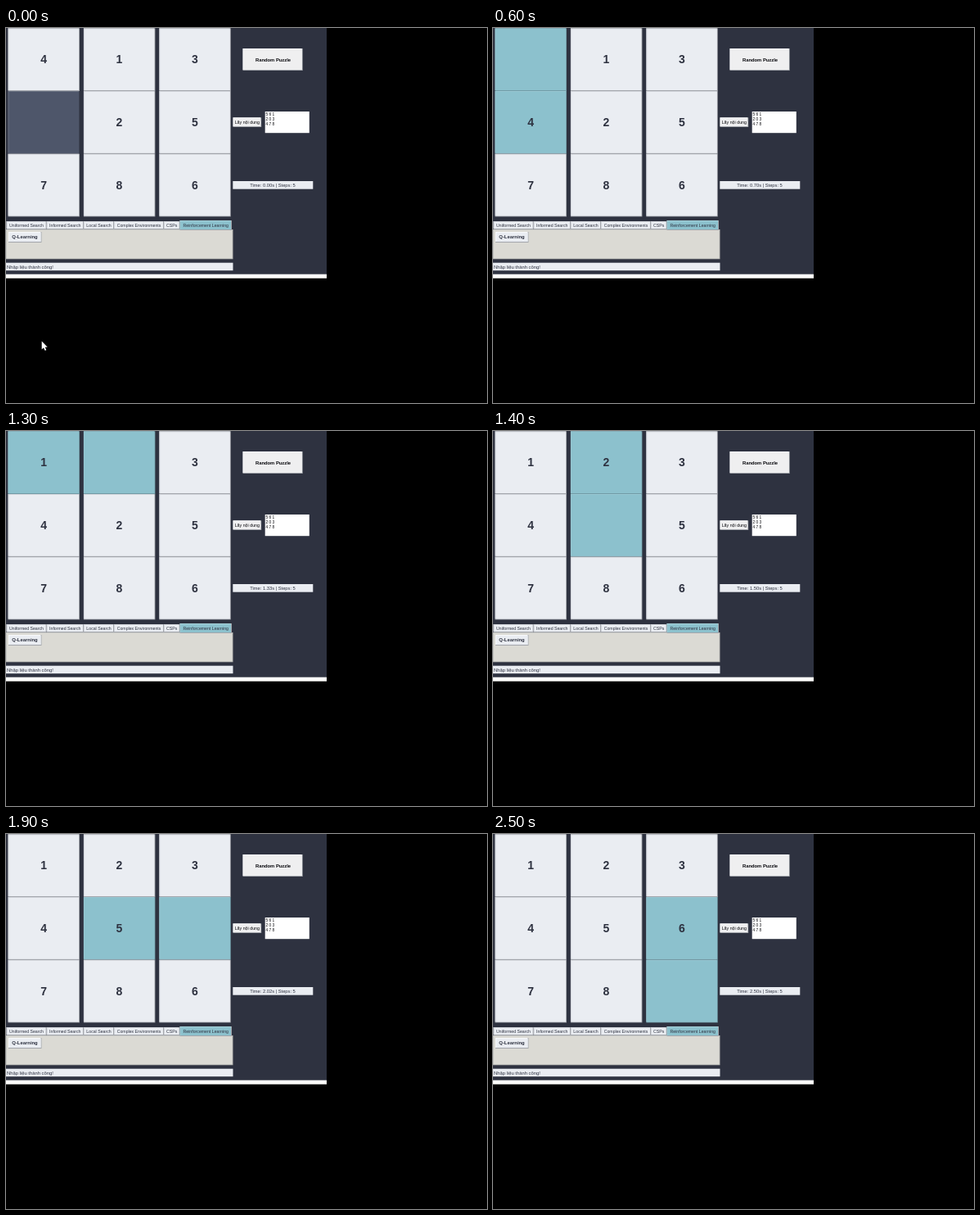
Recreate the animation shown at these times as an HTML page with a canvas. Size 588 px wide and 458 px high, loop 2700 ms.

```html
<!DOCTYPE html>
<html lang="vi">
<head>
<meta charset="utf-8">
<style>
html, body { margin: 0; width: 100%; height: 100%; overflow: hidden; background: #000; }
canvas { display: block; }
</style>
</head>
<body>
<canvas id="stage" width="588" height="458"></canvas>
<script>
const ctx = document.getElementById('stage').getContext('2d');
const LOOP = 2700;
const INK = '#2e3240', PALE = '#eaedf2', TEAL = '#8cc1cd', SLATE = '#4e566a';
const FACE = '#efeff0', BLACK = '#08080c';

const START = '413025786';
const blankPath = [3, 0, 1, 4, 5, 8];
const FIRST_MOVE = 400, MOVE_EVERY = 500;

// [time in ms, clock reading]
const clock = [
  [0, '0.00'], [100, '0.10'], [200, '0.21'], [300, '0.32'], [400, '0.50'], [500, '0.60'],
  [600, '0.70'], [900, '1.01'], [1000, '1.11'], [1100, '1.22'], [1300, '1.33'], [1400, '1.50'],
  [1600, '1.70'], [1900, '2.02'], [2000, '2.12'], [2300, '2.33'], [2400, '2.50']
];

const tabs = [
  ['Uniformed Search', 0.5, 49.5], ['Informed Search', 49.5, 95], ['Local Search', 95, 132],
  ['Complex Environments', 132, 193], ['CSPs', 193, 212.5], ['Reinforcement Learning', 212.5, 276]
];

function box(x, y, w, h, fill) {
  ctx.fillStyle = fill;
  ctx.fillRect(x, y, w, h);
}

function raised(x, y, w, h, fill, light = '#f8f9fb', shade = '#a3a6ac') {
  box(x, y, w, h, shade);
  box(x, y, w - 1, h - 1, light);
  box(x + 1, y + 1, w - 2, h - 2, fill);
}

// y is the vertical middle of the capitals
function label(text, x, y, size, { bold = false, align = 'left', color = INK } = {}) {
  ctx.font = `${bold ? 'bold ' : ''}${size}px "Liberation Sans", Arial, sans-serif`;
  ctx.textAlign = align;
  ctx.fillStyle = color;
  ctx.fillText(text, x, y + size * 0.36);
}

function drawBoard(time) {
  const moves = Math.max(0, Math.min(5, Math.floor((time - FIRST_MOVE) / MOVE_EVERY) + 1));
  const board = [...START];
  for (let i = 1; i <= moves; i++) {
    board[blankPath[i - 1]] = board[blankPath[i]];
    board[blankPath[i]] = '0';
  }
  const lit = moves ? [blankPath[moves - 1], blankPath[moves]] : [];
  board.forEach((digit, i) => {
    const col = i % 3, row = Math.floor(i / 3);
    const x = 2.5 + col * 92.4, y = 0.3 + row * 76.7;
    if (lit.includes(i)) raised(x, y, 87.5, 76.7, TEAL, '#98c7d2', '#719ba6');
    else if (digit === '0') raised(x, y, 87.5, 76.7, SLATE, '#687080', '#3c4353');
    else raised(x, y, 87.5, 76.7, PALE, '#d3d6dc');
    if (digit !== '0') label(digit, x + 43.6, y + 38, 14, { bold: true, align: 'center' });
  });
}

function drawTabs() {
  raised(0, 246, 277.5, 36.3, '#dbdad4', '#c8c9c6', '#b4b4b0');
  tabs.forEach(([name, left, right], i) => {
    const selected = i === tabs.length - 1;
    raised(left, selected ? 235 : 236, right - left, selected ? 12 : 10,
      selected ? TEAL : PALE, selected ? '#a5d0d9' : '#d3d6dc', '#a3a6ac');
    label(name, (left + right) / 2, 241, 5.2, { align: 'center' });
  });
  raised(3, 249, 40.5, 13, PALE);
  label('Q-Learning', 23, 255.2, 5.9, { bold: true, align: 'center' });
}

function drawSidePanel(time) {
  raised(289.5, 25, 73.2, 27, FACE);
  label('Random Puzzle', 326.5, 38.4, 5.85, { bold: true, align: 'center', color: BLACK });
  raised(277.5, 109.3, 34.7, 11.7, FACE);
  label('Lấy nội dung', 294.8, 115, 5.3, { align: 'center', color: BLACK });
  box(316.7, 102, 54.1, 26.2, '#fff');
  ['5 6 1', '2 0 3', '4 7 8'].forEach((line, i) => {
    label(line, 317.6, 105.7 + i * 6, 4.8, { color: BLACK });
  });
  box(277.3, 187, 98, 9.7, PALE);
  const reading = clock.findLast(([start]) => start <= time)[1];
  label(`Time: ${reading}s | Steps: 5`, 298.2, 191.8, 5.75);
}

function drawPointer(x, y) {
  const outline = [[0, 0], [0, 10], [2.3, 7.9], [4, 11.5], [5.6, 10.8], [4, 7.3], [7, 7.2]];
  ctx.beginPath();
  outline.forEach(([dx, dy]) => ctx.lineTo(x + dx, y + dy));
  ctx.closePath();
  ctx.fillStyle = '#fff';
  ctx.fill();
}

function draw(time) {
  box(0, 0, 588, 458, '#000');
  box(0, 0, 392, 301, INK);
  box(0, 300.7, 392, 5, '#fdfdfb');
  drawBoard(time);
  drawTabs();
  box(0, 286.7, 277.5, 9.5, PALE);
  label('Nhập liệu thành công!', 1, 291.4, 5.85);
  drawSidePanel(time);
  if (time < 100) drawPointer(43.7, 382.5);
}

const startTime = performance.now();
function frame() {
  draw((performance.now() - startTime) % LOOP);
  requestAnimationFrame(frame);
}
frame();
</script>
</body>
</html>
```
